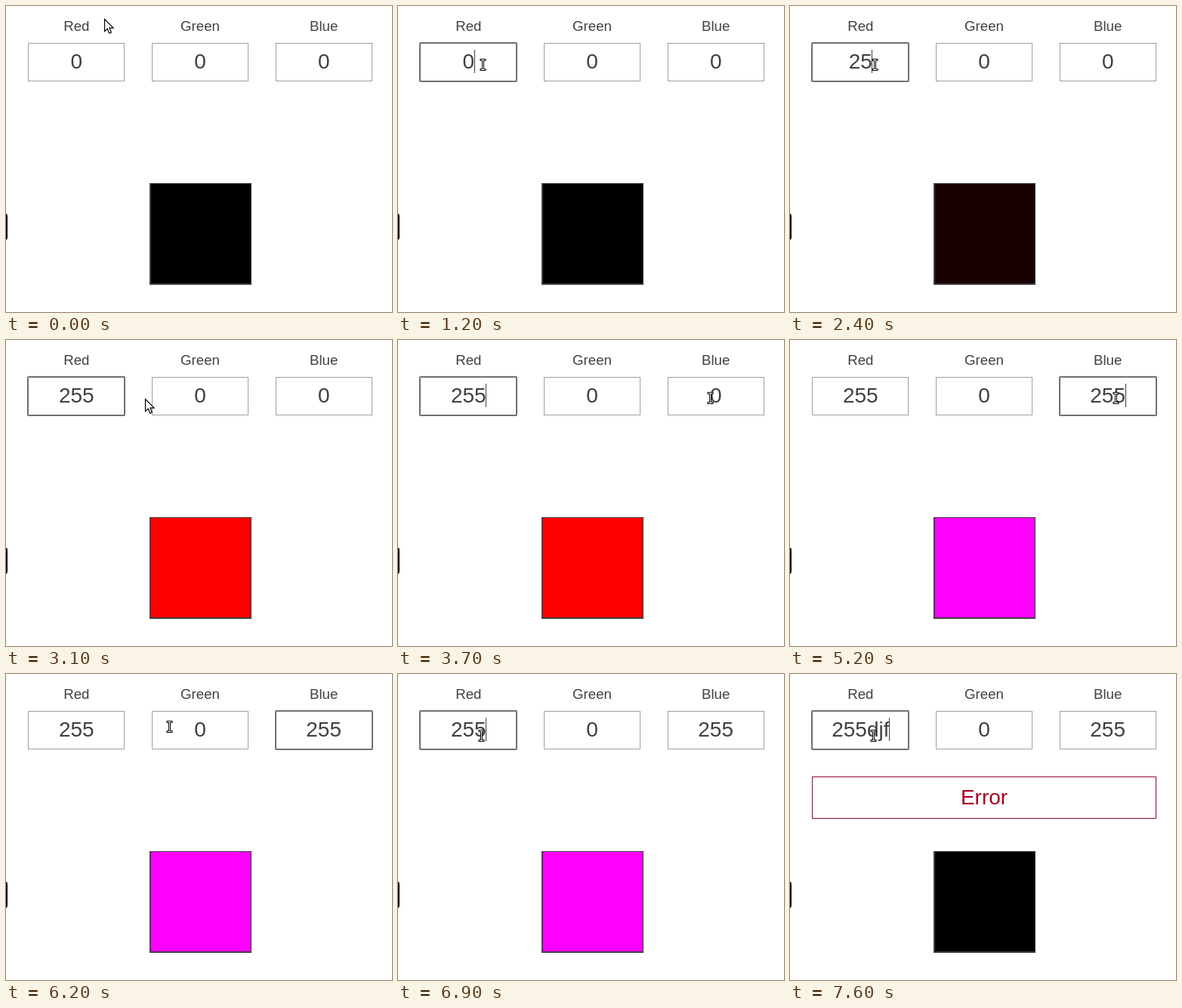
These frames come from a looping animation (511 px wide and 406 px high, 8000 ms). An HTML page:

```html
<!DOCTYPE html>
<html lang="en">
<head>
<meta charset="utf-8">
<title>RGB mixer</title>
<style>
  html, body { margin: 0; width: 100%; height: 100%; overflow: hidden; background: #fff; }
  svg { display: block; }
  text { font: 28px "Liberation Sans", Arial, sans-serif; text-anchor: middle; fill: #404040; }
  .label { font-size: 18.72px; }
  .box { fill: #fff; stroke: #a0a0a0; }
  #ring { fill: none; stroke: #707070; stroke-width: 2; }
  #error text { fill: #a50021; }
  #error rect { fill: #fff; stroke: #900a2a; }
</style>
</head>
<body>
<svg width="511" height="406" viewBox="0 0 511 406">
  <g id="fields"></g>
  <rect id="ring" y="49" width="128" height="51" rx="1"/>
  <rect id="caret" y="58" width="1" height="31" fill="#404040"/>
  <g id="error">
    <rect x="29.5" y="136.5" width="455" height="55"/>
    <text x="257" y="173">Error</text>
  </g>
  <rect x="190" y="235" width="135" height="135" fill="#404040"/>
  <rect id="swatch" x="192" y="236" width="132" height="132"/>
  <rect x="-20" y="275" width="22" height="36" rx="4"/>
  <path id="arrow" d="M.5 .5V16.6L4.3 13.2 6.7 19.2 9.4 18 6.9 12.2H12Z" fill="#fff" stroke="#000" stroke-width="1.2"/>
  <g id="beam" fill="none" stroke-linecap="square">
    <path id="stem" d="M-3 -6.5H2M-3 6.5H2M-.5 -6.5V6.5" stroke-width="3" stroke="#000"/>
    <path d="M-3 -6.5H2M-3 6.5H2M-.5 -6.5V6.5" stroke="#fff"/>
  </g>
</svg>
<script>
const $ = id => document.getElementById(id);
const LOOP = 8000, BLINK = 600, STEP = 100;
const names = ["Red", "Green", "Blue"];
const centers = names.map((_, i) => 257 + (i - 1) * 163.67);

const smooth = p => p * p * (3 - 2 * p);
const easeOut = p => 1 - (1 - p) ** 2.4;

// Pointer strokes: each starts where the one before ended; lift bows the path upwards
const strokes = [
  { from: 200, to: 500, x: 115, y: 79 },
  { from: 800, to: 1000, x: 113, y: 78 },
  { from: 3100, to: 4000, x: 432, y: 77, ease: easeOut },
  { from: 5800, to: 6500, x: 117, y: 83, lift: 12 },
  { from: 6700, to: 6700, x: 111, y: 82 }
];

// Click time per field, then bursts of keys by start time ("<" is backspace)
const visits = [
  { field: 0, click: 1200, bursts: { 1900: "<2", 2400: "55" } },
  { field: 2, click: 4000, bursts: { 4700: "<2", 5100: "55" } },
  { field: 0, click: 6900, bursts: { 7400: "djf" } }
];

$("fields").innerHTML = names.map((name, i) => `
  <text class="label" x="${centers[i]}" y="33">${name}</text>
  <rect class="box" x="${Math.round(centers[i]) - 63.5}" y="49.5" width="127" height="50"/>
  <text class="value" x="${centers[i]}" y="83"></text>`).join("");
const valueTexts = document.querySelectorAll(".value");

const show = (el, on) => el.setAttribute("visibility", on ? "visible" : "hidden");

function pointerAt(t) {
  let x = 130, y = 17;
  for (const s of strokes) {
    if (t < s.from) break;
    const p = Math.min(1, (t - s.from + STEP) / (s.to - s.from + STEP));
    const k = (s.ease || smooth)(p);
    x += (s.x - x) * k;
    y += (s.y - y) * k - (s.lift || 0) * Math.sin(Math.PI * p);
  }
  return [Math.round(x), Math.round(y)];
}

function drawPointer(t) {
  const [x, y] = pointerAt(t);
  const inField = y >= 49 && y < 100 && centers.some(c => Math.abs(x - c) < 64);
  for (const id of ["arrow", "beam"]) {
    $(id).setAttribute("transform", `translate(${x} ${y})`);
    show($(id), (id === "beam") === inField);
  }
}

function formAt(t) {
  const form = { values: ["0", "0", "0"], focus: -1, touched: 0 };
  for (const { field, click, bursts } of visits) {
    if (t < click) break;
    form.focus = field;
    form.touched = click;
    for (const [start, keys] of Object.entries(bursts)) {
      [...keys].forEach((key, i) => {
        const time = +start + i * STEP;
        if (t < time) return;
        const value = form.values[field];
        form.values[field] = key === "<" ? value.slice(0, -1) : value + key;
        form.touched = time;
      });
    }
  }
  return form;
}

function drawForm(t) {
  const { values, focus, touched } = formAt(t);
  valueTexts.forEach((el, i) => {
    if (el.textContent !== values[i]) el.textContent = values[i];
  });

  const invalid = values.some(v => isNaN(v));
  show($("error"), invalid);
  $("swatch").setAttribute("fill", invalid ? "#000" : `rgb(${values.map(Number)})`);

  const focused = focus >= 0;
  show($("ring"), focused);
  show($("caret"), focused && Math.floor((t - touched) / BLINK) % 2 === 0);
  if (focused) {
    const half = values[focus] ? valueTexts[focus].getComputedTextLength() / 2 : 0;
    $("ring").setAttribute("x", Math.round(centers[focus]) - 64);
    $("caret").setAttribute("x", Math.floor(centers[focus] + half));
  }
}

function frame() {
  // The screen refreshes in whole steps
  const t = Math.floor(performance.now() % LOOP / STEP) * STEP;
  drawForm(t);
  drawPointer(t);
  requestAnimationFrame(frame);
}
frame();
</script>
</body>
</html>
```
